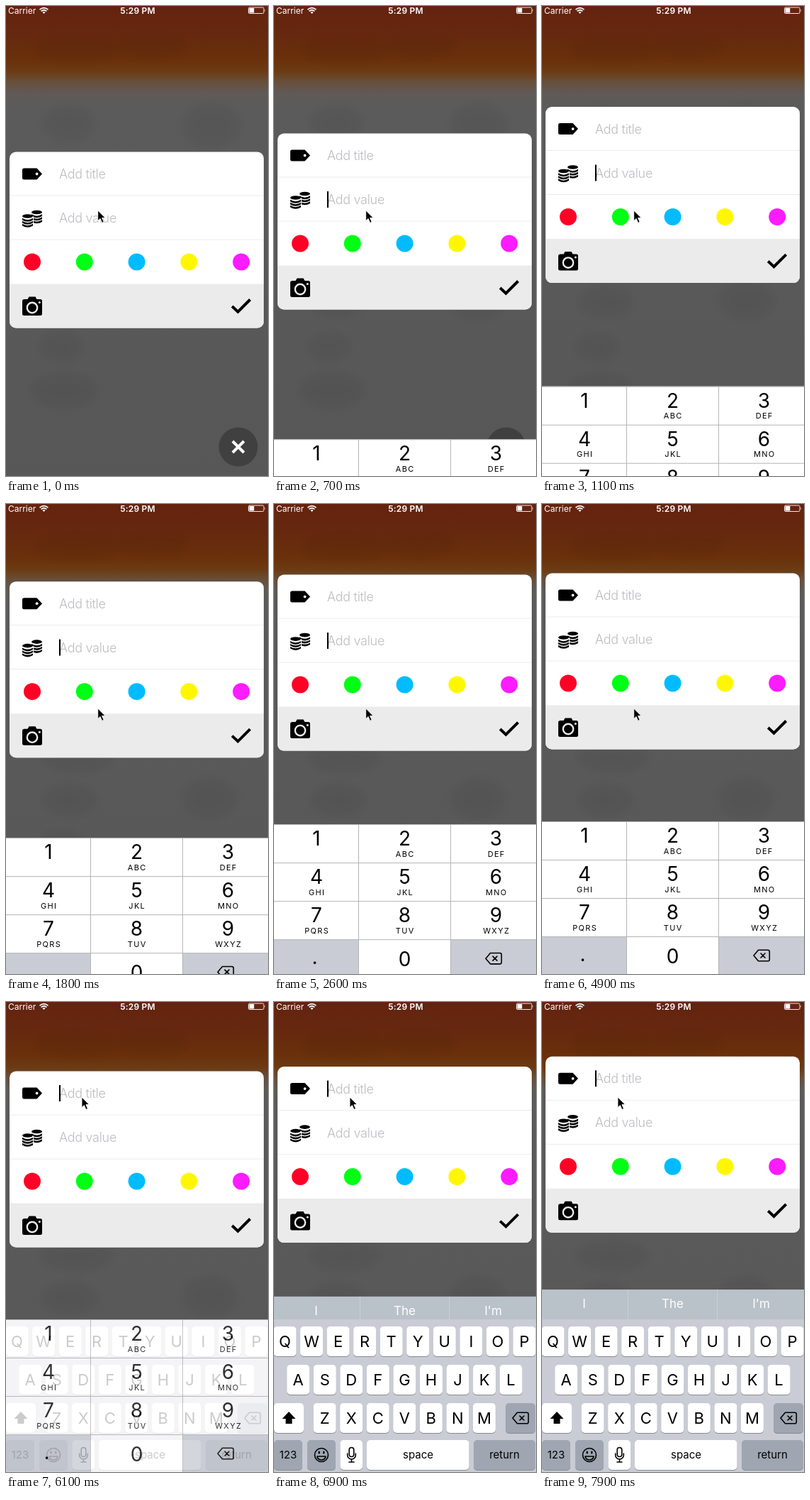
Animation, 370 px wide and 662 px high, one loop 8 s. Source, as an HTML page:

```html
<!DOCTYPE html>
<html lang="en">
<head>
<meta charset="utf-8">
<title>Add entry form</title>
<style>
html, body { margin: 0; width: 100%; height: 100%; overflow: hidden; background: #5a5a5a; }
svg { display: block; width: 370px; height: 662px; font-family: Inter, Roboto, sans-serif; }
.hint { font-size: 18px; font-weight: 300; letter-spacing: -.3px; fill: #bdbdc2; }
.mid { text-anchor: middle; }
.digit { font-size: 28px; }
.sub { font-size: 11px; letter-spacing: 1.3px; }
.letter { font-size: 22px; }
.label { font-size: 15px; }
.guess { font-size: 17px; fill: #fff; }
.line { fill: none; stroke: #000; stroke-width: 1.6; stroke-linejoin: round; stroke-linecap: round; }
</style>
</head>
<body>
<svg viewBox="0 0 370 662">
  <defs>
    <linearGradient id="sky" x2="0" y2="662" gradientUnits="userSpaceOnUse">
      <stop offset="0" stop-color="#64230f"/>
      <stop offset=".06" stop-color="#66280f"/>
      <stop offset=".115" stop-color="#6a310b"/>
      <stop offset=".14" stop-color="#6b3b13"/>
      <stop offset=".16" stop-color="#684e38"/>
      <stop offset=".185" stop-color="#5f5a57"/>
      <stop offset=".21" stop-color="#5b5b5b"/>
      <stop offset="1" stop-color="#575757"/>
    </linearGradient>
    <filter id="soft" x="-30%" y="-30%" width="160%" height="160%"><feGaussianBlur stdDeviation="6"/></filter>
    <g id="erase">
      <path class="line" d="M-11 0L-4.5-7.7H9q2.3 0 2.3 2.3V5.4q0 2.3-2.3 2.3H-4.5ZM-1-3l6 6m0-6l-6 6"/>
    </g>
  </defs>

  <rect width="370" height="662" fill="url(#sky)"/>
  <g id="blobs" filter="url(#soft)" fill="#000" opacity=".045"></g>

  <g fill="#fff">
    <text x="3" y="10.5" font-size="12">Carrier</text>
    <text class="mid" x="186" y="10.7" font-size="12" font-weight="600" letter-spacing=".2">5:29 PM</text>
    <g fill="none" stroke="#fff" stroke-width="1.7">
      <path d="M47.5 5.2q6-5 12 0M49.6 7.4q3.9-3.3 7.8 0"/>
      <path d="M53.5 11l-2.1-2.2q2.1-1.7 4.2 0Z" fill="#fff" stroke="none"/>
      <rect x="342.5" y="2" width="21.5" height="8.5" rx="1.5" stroke-width=".9"/>
    </g>
    <rect x="343.5" y="3" width="6.8" height="6.5"/>
    <path d="M365 4.7q1.6 1.5 0 3Z"/>
  </g>

  <circle cx="328" cy="621" r="27.5" fill="#404040"/>
  <path d="M320 613l16 16m0-16l-16 16" stroke="#fff" stroke-width="4"/>

  <g id="card">
    <rect x="5" width="359" height="248" rx="9" fill="#fff"/>
    <path d="M5 186H364V239a9 9 0 0 1-9 9H14a9 9 0 0 1-9-9Z" fill="#ebebeb"/>
    <path d="M5 61.5H364M5 123.5H364" stroke="#ececec"/>
    <path d="M25.5 23H43.5L51 31L43.5 39H25.5Q23 39 23 36.5V25.5Q23 23 25.5 23Z"/>
    <circle cx="43.6" cy="31" r="1.9" fill="#fff"/>
    <g id="coins"></g>
    <text class="hint" x="75" y="37.6">Add title</text>
    <text class="hint" x="75" y="99.6">Add value</text>
    <rect id="caret" x="75" width="2" height="23"/>
    <g id="dots"></g>
    <path d="M26 207.5H30.5L32.5 204H41.5L43.5 207.5H48.5Q51 207.5 51 210V228Q51 230.5 48.5 230.5H25.5Q23 230.5 23 228V210Q23 207.5 26 207.5Z"/>
    <circle cx="37" cy="219.5" r="7.2" fill="none" stroke="#ebebeb" stroke-width="2.4"/>
    <circle cx="47.3" cy="212" r="1.5" fill="#ebebeb"/>
    <path d="M319.3 217.5L327.5 225.2L344.7 208" fill="none" stroke="#000" stroke-width="4"/>
  </g>

  <g id="numpad">
    <rect width="370" height="216" fill="#fff"/>
    <path d="M0 162.5H119.5V216H0ZM249.5 162.5H370V216H249.5Z" fill="#c9ccd4"/>
    <path d="M0 .5H370M0 54.5H370M0 108.5H370M0 162.5H370M119.5 0V216M249.5 0V216" stroke="#b4b4b7"/>
    <g id="digits"></g>
    <use href="#erase" x="310" y="189"/>
  </g>

  <g id="qwerty">
    <g id="bar">
      <rect width="370" height="60" fill="#b9c1c9"/>
      <path d="M121.5 0V60M247.5 0V60" stroke="#c9cfd6"/>
      <g id="guesses"></g>
    </g>
    <rect y="447" width="370" height="215" fill="#c9ccd4"/>
    <g id="keys"></g>
    <path d="M21 577L30.5 587H25.5V594H16.5V587H11.5Z"/>
    <use href="#erase" x="348" y="586"/>
    <g class="line">
      <circle cx="67" cy="638" r="9.5"/>
      <path d="M61 640H73Q72 645 67 645T61 640Z"/>
      <path d="M63.7 633.5v2M70.3 633.5v2" stroke-width="2.2"/>
      <rect x="106.2" y="627.5" width="6.6" height="13" rx="3.3"/>
      <path d="M103.7 636v2.2a5.8 5.8 0 0 0 11.6 0V636M109.5 644v4M106 648h7"/>
    </g>
  </g>

  <path id="pointer" d="M0 0V14.6L3.4 11.5L6 17.4L8.5 16.3L5.9 10.5H10.5Z" stroke="#fff" stroke-width=".9"/>
</svg>
<script>
const $ = id => document.getElementById(id);
const fill = (id, parts) => { $(id).innerHTML = parts.join(''); };
const text = (cls, x, y, s) => `<text class="mid ${cls}" x="${x}" y="${y}">${s}</text>`;
const key = (x, y, w, color = '#fff') =>
  `<rect x="${x}" y="${y + 1}" width="${w}" height="42" rx="5" fill="#888b91"/>` +
  `<rect x="${x}" y="${y}" width="${w}" height="42" rx="5" fill="${color}"/>`;

fill('blobs', [[88, 165, 36, 24], [290, 168, 40, 30], [100, 358, 50, 20], [90, 417, 38, 22],
  [288, 415, 38, 28], [78, 480, 30, 20], [82, 541, 46, 24], [100, 62, 60, 18], [205, 58, 50, 16]]
  .map(([x, y, rx, ry]) => `<ellipse cx="${x}" cy="${y}" rx="${rx}" ry="${ry}"/>`));

fill('dots', ['#ff0026', '#00ff14', '#00bcff', '#fff700', '#fb1cff']
  .map((c, i) => `<circle cx="${37 + i * 73.8}" cy="155" r="12" fill="${c}"/>`));

const stack = (x, y) => `<ellipse cx="${x}" cy="${y}" rx="7.5" ry="2.8"/>` +
  [4, 8, 12].map(d => `<path d="M${x - 7.5} ${y + d - 1.2}q7.5 4.8 15 0v2.6q-7.5 4.8-15 0Z"/>`).join('');
fill('coins', [stack(43.5, 85),
  '<path d="M22 91Q30.5 84.5 39 91V106H22Z" fill="#fff"/>', stack(30.5, 90.5)]);

const columns = [60, 184.5, 313.5];
const groups = ['', 'ABC', 'DEF', 'GHI', 'JKL', 'MNO', 'PQRS', 'TUV', 'WXYZ'];
fill('digits', [
  ...groups.map((g, i) => {
    const x = columns[i % 3], y = 54 * Math.floor(i / 3);
    return text('digit', x, y + 30, i + 1) + text('sub', x + .7, y + 45.7, g);
  }),
  text('digit', 184.5, 200, 0), text('digit', 57.5, 197, '.')]);

fill('guesses', ['I', 'The', "I'm"].map((s, i) => text('guess', 59.5 + i * 125, 25.7, s)));

const grey = '#9fa6b1';
const rows = [['QWERTYUIOP', 15.5, 457], ['ASDFGHJKL', 34.2, 511], ['ZXCVBNM', 71.6, 565]];
fill('keys', [
  ...rows.flatMap(([letters, x0, y]) => [...letters].map((s, i) => {
    const x = x0 + i * 37.55;
    return key(x - 16, y, 32) + text('letter', x, y + 29, s);
  })),
  key(0, 565, 42), key(327, 565, 42, grey),
  key(0, 617, 40, grey), key(47, 617, 40, grey), key(93.5, 617, 31.5), key(131, 617, 144.5), key(282, 617, 87, grey),
  text('label', 20, 643.3, 123), text('label', 203.5, 643, 'space'), text('label', 325.5, 643, 'return')]);

const clamp = v => Math.min(1, Math.max(0, v));
const ramp = (t, a, b) => clamp((t - a) / (b - a));
const smooth = v => v * v * (3 - 2 * v);
// Critically damped spring, rate per second
const spring = (t, start, rate) => {
  const w = Math.max(0, t - start) / 1000 * rate;
  return 1 - (1 + w) * Math.exp(-w);
};
const move = (id, x, y) => $(id).setAttribute('transform', `translate(${x.toFixed(2)} ${y.toFixed(2)})`);

const LOOP = 8000, STEP = 100, TITLE_TAP = 6000;

function draw(t) {
  const rise = spring(t, 340, 2.6);
  move('card', 0, 205.5 - 108 * rise - 20.7 * spring(t, 6800, 11.2));
  move('numpad', 0, 662 - 215 * rise);

  const barRise = 1 - Math.exp(-Math.max(0, t - 6800) / 1000 * 14.5);
  move('bar', 0, 447 - 42 * barRise);
  $('qwerty').setAttribute('opacity', ramp(t, TITLE_TAP, 6500));

  const inTitle = t >= TITLE_TAP;
  $('caret').setAttribute('y', inTitle ? 19.5 : 81.5);
  $('caret').setAttribute('opacity', inTitle ? 1 : t < 300 ? 0 : 1 - ramp(t, 3700, 4400));

  const go = smooth(ramp(t, 5400, 5900));
  move('pointer', 129.7 - 22.7 * go, 288 - 154 * go);
}

function tick() {
  draw(Math.floor(performance.now() % LOOP / STEP) * STEP);
  requestAnimationFrame(tick);
}
tick();
</script>
</body>
</html>
```
